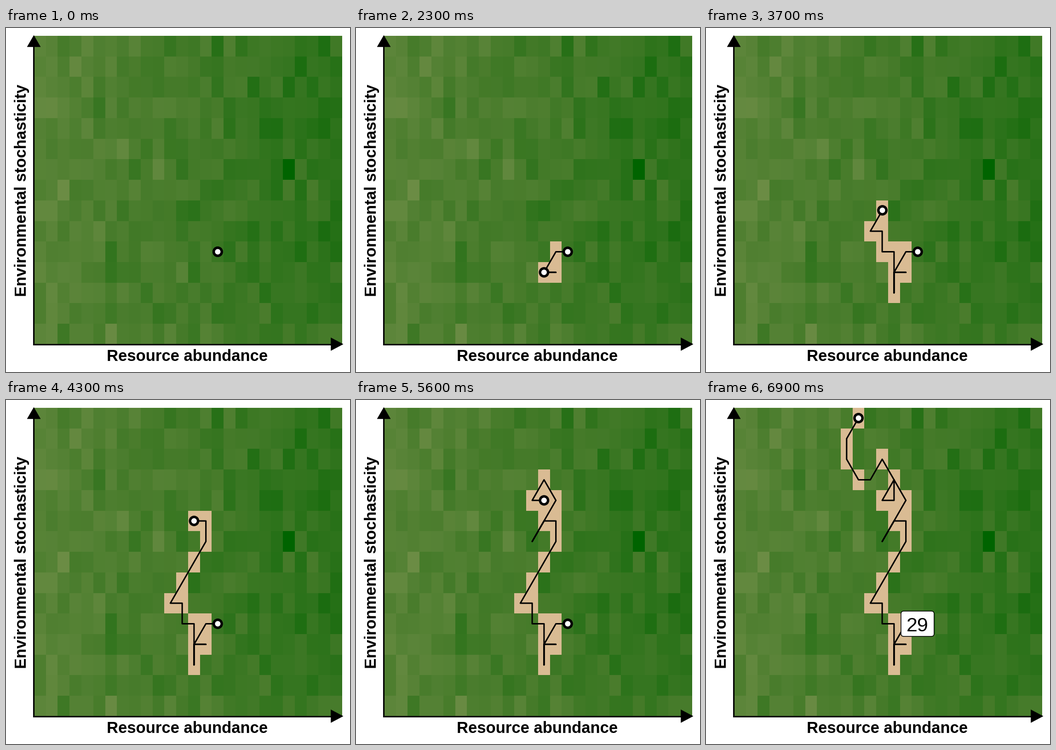
A matplotlib script that plays this animation: 748x748 px, repeating every 10 s.

```python
import numpy as np
import matplotlib.pyplot as plt
from matplotlib.animation import FuncAnimation
from matplotlib.patches import Circle, FancyBboxPatch, Polygon

SIZE, DPI = 748, 100
PX = 72 / DPI  # points per pixel
COLS, ROWS = 26, 15
LEFT, RIGHT, TOP, BOTTOM = 61, 731, 17, 687.8
TAN = np.array([217, 187, 147]) / 255
START_HOLD, STEPS, FRAMES = 15, 54, 100

START = (15, 10)  # column, row
MOVES = ("W SW E W S N N W N W NE NE NE N W SW NE NE NW SW E N NW SW W "
         "NW N NE").split()
REGROWN = {(12, 10): 14, (12, 6): 20, (11, 3): 24}  # cell: move number


def make_land():
    """Resources rise to the right, with noise and one richest patch."""
    rng = np.random.default_rng(4)
    level = np.linspace(0.27, 0.65, COLS) + rng.normal(0, 0.085, (ROWS, COLS))
    level = np.clip(level, 0.06, 0.88)
    level[6, 21] = 1
    stops = [0, 0.45, 1]
    channels = [(113, 70, 0), (143, 123, 100), (73, 42, 0)]
    return np.dstack([np.interp(level, stops, c) for c in channels]) / 255


def make_walk():
    cells = [START]
    for move in MOVES:
        col, row = cells[-1]
        cells.append((col + ("E" in move) - ("W" in move),
                      row + ("S" in move) - ("N" in move)))
    return cells


def center(cells):
    cols, rows = np.array(cells).T
    return (LEFT + (cols + 0.5) * (RIGHT - LEFT) / COLS,
            TOP + (rows + 0.5) * (BOTTOM - TOP) / ROWS)


def walked(step):
    """Moves made so far: each one is a quick hop followed by a rest."""
    whole, part = divmod(step * len(MOVES) / STEPS, 1)
    t = np.clip((part - 0.4) / 0.1, 0, 1)
    return whole + t * t * (3 - 2 * t)


def add_marker(x, y):
    return ax.add_patch(Circle((x, y), 8.7, fc="white", ec="black",
                               lw=5.4 * PX, zorder=5))


fig = plt.figure(figsize=(SIZE / DPI, SIZE / DPI), dpi=DPI, facecolor="white")
ax = fig.add_axes([0, 0, 1, 1])
ax.axis("off")

land = make_land()
image = ax.imshow(land, extent=(LEFT, RIGHT, BOTTOM, TOP), aspect="auto",
                  interpolation="nearest")
ax.set_xlim(0, SIZE)
ax.set_ylim(SIZE, 0)

# Axes with arrowheads
ax.plot([60.5, 60.5, 715], [30, 688, 688], color="black", lw=3.2 * PX,
        solid_joinstyle="miter", zorder=3)
for tip in ([(60.5, 16), (46, 41), (75, 41)],
            [(733, 687.5), (706.5, 673.5), (706.5, 701.5)]):
    ax.add_patch(Polygon(tip, fc="black", ec="black", lw=0.5 * PX, zorder=4))

title = dict(family="Liberation Sans", weight="bold", size=34.6 * PX,
             ha="center", va="baseline", rotation_mode="anchor")
ax.text(394, 724, "Resource abundance", **title)
ax.text(44.5, 353, "Environmental stochasticity", rotation=90, **title)

walk = make_walk()
walk_x, walk_y = center(walk)
trail, = ax.plot([], [], color="black", lw=3.1 * PX, solid_capstyle="butt",
                 zorder=3)
add_marker(walk_x[0], walk_y[0])
forager = add_marker(walk_x[0], walk_y[0])

badge = ax.add_patch(FancyBboxPatch(
    (430, 465), 60, 43, boxstyle="round,pad=6,rounding_size=6",
    fc="white", ec="black", lw=1.6 * PX, zorder=6))
count = ax.text(460, 502.5, str(len(walk)), family="Liberation Sans",
                size=43 * PX, ha="center", va="baseline", zorder=7)


def draw(frame):
    step = min(max(frame - START_HOLD, 0), STEPS)
    pos = walked(step)
    last = int(pos)

    colors = land.copy()
    for col, row in walk[1:last + 1]:
        if pos < REGROWN.get((col, row), FRAMES):
            colors[row, col] = TAN
    image.set_data(colors)

    order = np.arange(len(walk))
    x, y = np.interp(pos, order, walk_x), np.interp(pos, order, walk_y)
    trail.set_data([*walk_x[:last + 1], x], [*walk_y[:last + 1], y])
    forager.center = x, y

    for part in (badge, count):
        part.set_visible(step == STEPS)
    return image, trail, forager, badge, count


anim = FuncAnimation(fig, draw, frames=FRAMES, interval=100, repeat=True,
                     repeat_delay=0, blit=False)
plt.show()
```
